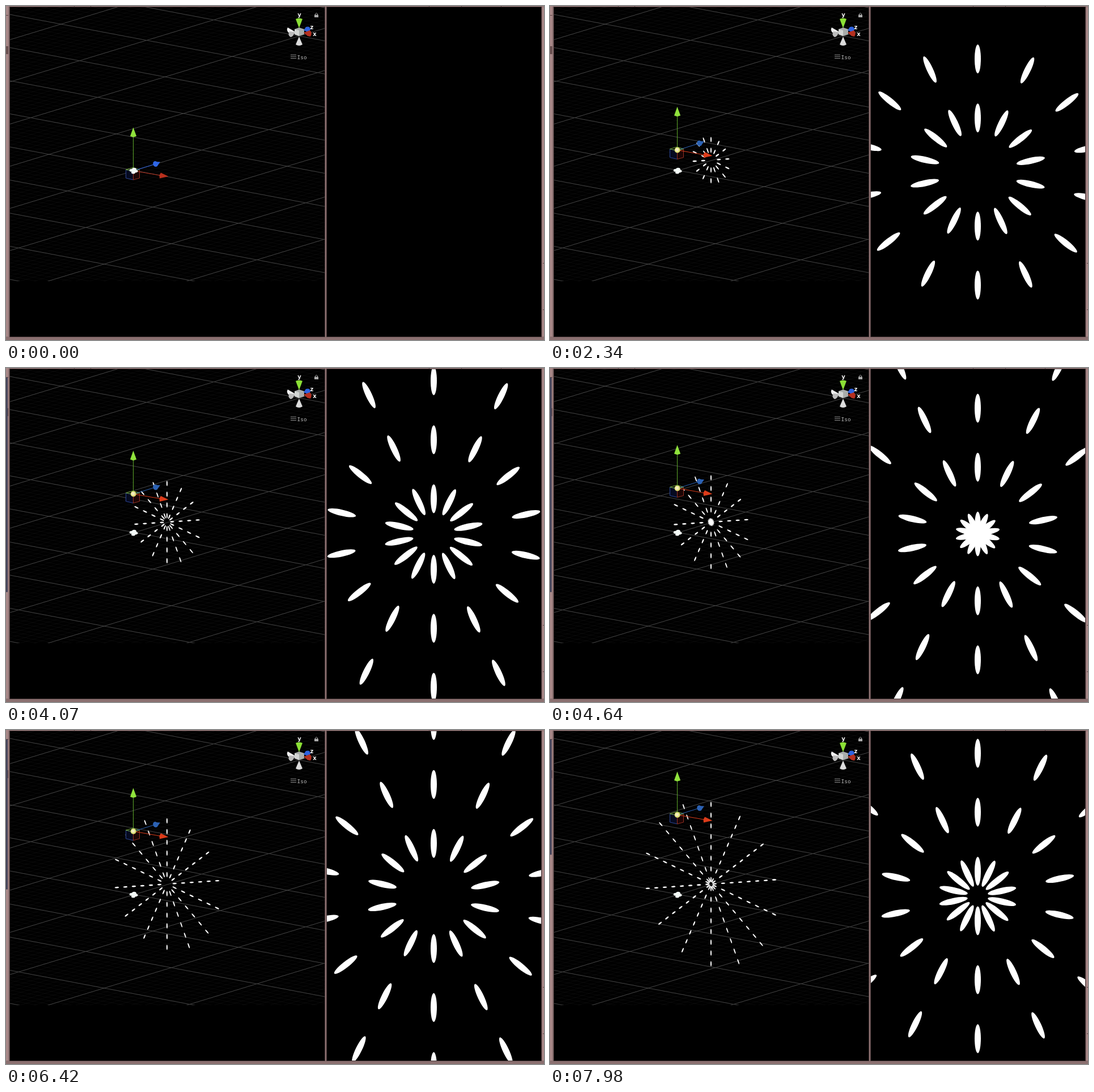
Write an HTML page with a canvas that moves like this. It is 949x590 px and loops after 8 s.

```html
<!DOCTYPE html>
<html lang="en">
<head>
<meta charset="utf-8">
<title>Radial bullet pattern</title>
<style>
  html, body { margin: 0; width: 100%; height: 100%; overflow: hidden; background: #8b7070; }
  svg, canvas { position: absolute; left: 0; top: 0; width: 949px; height: 590px; }
  text { fill: #f2f2f2; font: bold 10px "DejaVu Sans", sans-serif; text-anchor: middle; }
  .iso { fill: #b8b8b8; font: 9.5px "DejaVu Sans Mono", monospace; text-anchor: start; }
</style>
</head>
<body>
<svg viewBox="0 0 949 590">
  <defs><clipPath id="floor"><rect x="7" y="2" width="555" height="484"/></clipPath></defs>
  <rect width="949" height="590" fill="#8b7070"/>
  <path d="M0 0H949V1H0Z" fill="#a98b8b"/>
  <path d="M0 0H4V584H0Z" fill="#a88888"/>
  <path d="M946 2H949V584H946Z" fill="#a98989"/>
  <path d="M0 71H4V85H0Z" fill="#695050"/>
  <path d="M0 16.5H4M120.5 0V2M149.5 0V2M746.5 0V2M803.5 0V2M873.5 0V2M947 454.5H949M947 536.5H949" stroke="#5c4646"/>
  <path d="M6 1H563V585H6ZM565 1H945V585H565Z" fill="#4b3a3b"/>
  <path d="M7 2H562V584H7ZM566 2H944V584H566Z"/>
  <g clip-path="url(#floor)" fill="none">
    <path id="minor" stroke="#fff" stroke-opacity=".035"/>
    <path id="major" stroke="#434343"/>
  </g>

  <path d="M517 54L511 68Q517 72 523 68Z" fill="#dcdcdc"/>
  <path d="M497 38Q494 42 498 47L511 46Z" fill="#f0f0f0"/>
  <path d="M511 46L500 45Q496 51 502 55Q506 54 507 51Z" fill="#bcbcbc"/>
  <path d="M509 41L517 38L526 41V50L517 53L509 50Z" fill="#a9adab"/>
  <path d="M509 41L517 43V53L509 50Z" fill="#d3d6d4"/>
  <path d="M525 43L529 37Q536 35 537 41L535 47Z" fill="#2f63e0"/>
  <path d="M525 47L536 43Q541 47 537 54L532 53Z" fill="#b53020"/>
  <path d="M511 23Q517 20 523 23L517 39Z" fill="#8be035"/>
  <text x="517.5" y="19">y</text>
  <text x="539.5" y="41">z</text>
  <text x="544.5" y="53">x</text>
  <path d="M544 15.5H551V20H544Z" fill="#aaa"/>
  <path d="M545.5 16V14Q547.5 11 549.5 14V16" fill="none" stroke="#aaa"/>
  <path d="M502 86.5H512M502 89.5H512M502 92.5H512" stroke="#888"/>
  <text class="iso" x="513.5" y="93.5">Iso</text>
</svg>
<canvas id="stage" width="949" height="590"></canvas>
<script>
const LOOP = 8000;
const START = 640;        // time of the first running tick
const TICK = 78.2;
const SPEED = 7.964;      // ring growth per tick
const RING_GAP = 104.2;
const PETALS = 14;
const LIFT = 0.1825;      // handle rise per unit of travel
const ctx = document.getElementById('stage').getContext('2d');

// Floor grid: two families of parallel lines, every tenth one bright.
function gridPath(step) {
  let d = '';
  for (let y = 15 - 58.5 * 2; y < 490; y += 58.5 * step) d += `M7 ${y}l555 105`;
  for (let y = 134 - 74.5 * 2; y < 660; y += 74.5 * step) d += `M7 ${y}l555 -169`;
  return d;
}
document.getElementById('minor').setAttribute('d', gridPath(0.1));
document.getElementById('major').setAttribute('d', gridPath(1));

// Distance covered by the outermost ring; it holds still until START.
function travelAt(t) {
  if (t < 80) return -1;
  if (t < START) return 4;
  return 24.5 + SPEED * Math.floor((t - START) / TICK + 0.27);
}

function shape(fill, points, stroke) {
  ctx.beginPath();
  points.forEach(([x, y]) => ctx.lineTo(x, y));
  ctx.closePath();
  if (fill) { ctx.fillStyle = fill; ctx.fill(); }
  if (stroke) { ctx.strokeStyle = stroke; ctx.stroke(); }
}

function line(color, x0, y0, x1, y1) {
  ctx.strokeStyle = color;
  ctx.beginPath();
  ctx.moveTo(x0, y0);
  ctx.lineTo(x1, y1);
  ctx.stroke();
}

function oval(color, x, y, rx, ry, turn = 0) {
  ctx.fillStyle = color;
  ctx.beginPath();
  ctx.ellipse(x, y, rx, ry, turn, 0, Math.PI * 2);
  ctx.fill();
}

function burst(travel, left, width, petalWidth, matrix) {
  ctx.save();
  ctx.beginPath();
  ctx.rect(left, 2, width, 582);
  ctx.clip();
  ctx.transform(...matrix);
  for (let r = travel; r >= 0; r -= RING_GAP) {
    for (let i = 0; i < PETALS; i++) {
      const a = Math.ceil(i * 360 / PETALS) * Math.PI / 180;
      oval('#fff', r * Math.sin(a), -r * Math.cos(a), petalWidth / 2, 25.5, a);
    }
  }
  ctx.restore();
}

function cameraIcon() {
  const white = '#f4fbf8';
  oval(white, 226, 288.8, 4, 3);
  oval(white, 221.3, 290.3, 3.5, 2.5);
  oval(white, 227.3, 291.8, 5.5, 2.8);
  oval(white, 224.5, 294, 3.5, 2.5);
}

function moveHandle(lift, started) {
  const red = started ? '#dd3c1a' : '#b8301d';
  const blue = started ? '#2c62b4' : '#2f66e6';
  ctx.save();
  ctx.translate(0, -lift);
  shape('#060a20', [[211.5, 289], [224.5, 292], [224.5, 307], [211.5, 304]], '#2c4697');
  shape('#1c0505', [[224.5, 292], [235.5, 289], [235.5, 304], [224.5, 307]], '#963022');
  shape(null, [[211.5, 289], [224.5, 292], [235.5, 289], [224, 285.5]], '#71a83a');
  line('#5fa82a', 224.5, 291, 224.5, 231);
  line(blue, 225, 291, 262, 279.5);
  line(red, 225, 291, 273, 299.5);
  shape(blue, [[261, 275], [272, 275.5], [266, 284]]);
  oval(blue, 263.5, 279, 4.2, 5, -0.3);
  shape(red, [[273, 294.5], [286.5, 301], [271, 304.5], [270.5, 299]]);
  shape('#90e23c', [[224.5, 214.5], [230.2, 230], [224.5, 231.8], [219, 230]]);
  if (started) {
    oval('#d9dc72', 224.7, 291, 5, 5);
    oval('#f3eec0', 224.2, 290.5, 3, 3);
  }
  ctx.restore();
}

// The list's scroll thumb shrinks as rings are added.
function scrollThumb(travel) {
  const rings = Math.floor((travel - 20) / RING_GAP) + 1;
  if (rings < 3) return;
  ctx.fillStyle = '#45445a';
  ctx.fillRect(0, 17, 3, 1000 / (0.36 + 0.57 * rings));
}

function draw(t) {
  const travel = travelAt(t);
  const started = t >= START;
  ctx.clearRect(0, 0, 949, 590);
  burst(travel, 566, 378, 11, [1, 0, 0, 1, 754.5, 293.2]);
  burst(travel, 7, 555, 14, [0.1475, 0.0287, 0, 0.182, 284, 272.2]);
  if (started) cameraIcon();
  moveHandle(Math.max(0, travel) * LIFT, started);
  if (!started) cameraIcon();
  scrollThumb(travel);
}

const begin = performance.now();
function loop() {
  draw((performance.now() - begin) % LOOP);
  requestAnimationFrame(loop);
}
loop();
</script>
</body>
</html>
```
